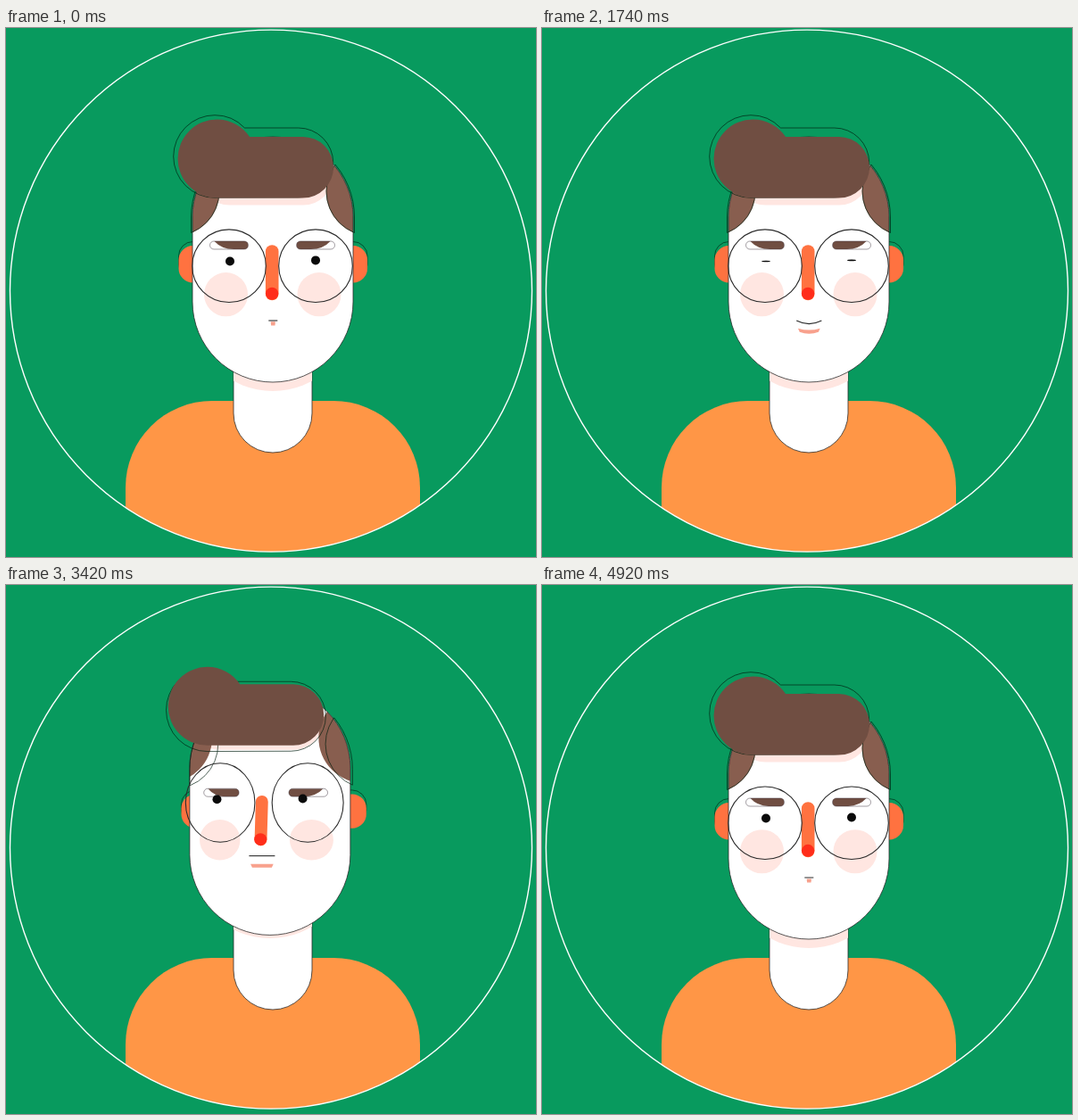
These frames come from a looping animation (594x593 px, 4950 ms). An HTML page with a canvas:

```html
<!DOCTYPE html>
<html lang="en">
<head>
<meta charset="utf-8">
<title>Portrait</title>
<style>
html, body { margin: 0; width: 100%; height: 100%; overflow: hidden; background: #089a5e; }
canvas { display: block; width: 594px; height: 593px; }
</style>
</head>
<body>
<canvas id="stage" width="594" height="593"></canvas>
<script>
const ctx = document.getElementById('stage').getContext('2d');
const LOOP = 4950;
const C = {
  bg: '#089a5e', shirt: '#ff9646', skin: '#ffffff', blush: '#ffe6e1', ear: '#ff7240',
  nose: '#ff2d1a', hair: '#704e42', side: '#885e4f', lip: '#f8a18d', line: '#2b2b2b',
  edge: 'rgba(0,30,15,.75)'
};

// Each measure is given for four poses: front, right, rising left, down.
const M = {
  headX: [299, 306.8, 296.5, 299.3], headTop: [212, 212, 209, 219], headBot: [307, 306.5, 305.5, 313],
  chin: [10, 9, 8.5, 20],
  sideX: [0, 17, -7, 0], sideY: [183, 183, 180, 200],
  rimX: [299, 306.3, 297, 298], rimR: [91.5, 94, 92.5, 94.5], rimTop: [212, 212, 209, 216],
  rimSideL: [189, 195, 186, 184], rimSideR: [409, 419, 409, 411], rimSideY: [183, 183, 181, 188],
  hairX: [236.5, 265.5, 228, 238], hairY: [146.5, 146.3, 144.2, 163.5], hairR: [367, 387, 359.7, 371.5],
  lineX: [234, 251.5, 227.5, 235], lineY: [144, 143.5, 143, 149.5], lineR: [366.7, 386.5, 360, 367.5],
  fringe: [8, 7, 7, 12],
  earL: [193.5, 198, 196, 193.5], earR: [405, 404, 404, 405], earY: [244, 243.3, 241, 257], earH: [41.5, 41.5, 41, 47],
  lensLX: [250, 275.5, 242, 250.8], lensLR: [41.3, 38.3, 39.2, 41.3],
  lensRX: [347, 370, 339.8, 347.6], lensRR: [41.3, 37.7, 40.2, 41.3],
  lensY: [266.7, 265.2, 261.4, 302], lensH: [40.8, 41, 41.2, 34.5],
  cheekLX: [246.5, 269, 241.2, 247.5], cheekLR: [24.5, 24.5, 23, 24.5],
  cheekRX: [351, 368.7, 344, 351.5], cheekRR: [24.5, 20, 24.5, 24.5],
  cheekY: [298.7, 298, 295, 317], cheekH: [24.6, 24.6, 24.4, 28],
  noseX: [298.2, 323.3, 289, 299.2], noseY: [250.5, 249.5, 248, 260.5],
  tipX: [298.2, 325.2, 288, 299.3], tipY: [298, 297.5, 293.8, 314.5], noseW: [14.6, 13, 14, 14.6],
  dotX: [298.1, 327, 287.7, 299.2], dotR: [7.2, 5.6, 7, 7],
  browL: [228.5, 251, 223, 229], browLW: [43, 43, 40, 43],
  browR: [325.5, 353, 318.5, 326], browRW: [43, 33, 43.5, 43], browY: [239, 238, 236.3, 255.3],
  eyeLX: [251, 292.3, 238, 249], eyeRX: [347, 373, 334, 344.7], eyeLY: [261.5, 261.5, 250, 277.7], eyeRY: [260.4, 260.3, 249, 276.2],
  mouthX: [299.3, 325, 289.3, 300.4], mouthY: [328, 326.5, 321.3, 363.3]
};

// Keys are [time, value] pairs joined by a smooth ease.
function track(keys, t) {
  if (t <= keys[0][0]) return keys[0][1];
  for (let i = 1; i < keys.length; i++) {
    const [a, x] = keys[i - 1], [b, y] = keys[i];
    if (t < b) return x + (y - x) * (0.5 - 0.5 * Math.cos(Math.PI * (t - a) / (b - a)));
  }
  return keys[keys.length - 1][1];
}

const turnEnd = [[910, 1.02], [1110, -0.1], [1230, 0], [1740, 0], [2040, -0.2], [2520, -0.2], [3060, 0]];
const T = {
  turn: [[0, 0], [540, 1.02], ...turnEnd],
  gaze: [[0, 0], [610, 1.02], ...turnEnd],
  down: [[1740, 0], [2040, 0.35], [2520, 0.35], [3060, 0], [3660, 0], [4140, 1], [4420, 1], [4935, 0]],
  rise: [[3090, 0], [3600, 1], [3660, 1], [4140, 0]],
  wide: [[1560, 0], [1770, 1], [3660, 1], [4140, 1.37], [4420, 1.37], [4935, 0]],
  smile: [[1560, 0], [1770, 1], [2520, 1], [3060, 0], [3660, 0], [4140, -0.4], [4420, -0.4], [4935, 0]],
  open: [[1620, 1], [1740, 0.16], [1860, 1], [3750, 1], [3870, 0.05], [3990, 1]]
};

function poseAt(t) {
  const k = {}, p = {};
  for (const n in T) k[n] = track(T[n], t);
  for (const n in M) {
    const [front, right, left, low] = M[n];
    const turn = n.startsWith('eye') ? k.gaze : k.turn;
    const dDown = low - front;
    const dRise = 1.64 * (left - front) - 0.64 * dDown;
    p[n] = front + turn * (right - front) + k.down * dDown + k.rise * dRise;
  }
  return Object.assign(p, k);
}

function fill(path, color) { ctx.fillStyle = color; ctx.fill(path); }
function stroke(path, color, width) { ctx.strokeStyle = color; ctx.lineWidth = width; ctx.stroke(path); }
function within(path, draw) { ctx.save(); ctx.clip(path); draw(); ctx.restore(); }

function oval(x, y, rx, ry = rx) {
  const p = new Path2D();
  p.ellipse(x, y, Math.max(rx, 0), Math.max(ry, 0), 0, 0, 2 * Math.PI);
  return p;
}
function box(x, y, w, h, r) {
  const p = new Path2D();
  p.roundRect(x, y, w, h, r);
  return p;
}
function capsule(x, top, bottom, r) { return box(x - r, top - r, 2 * r, bottom - top + 2 * r, r); }

function drawBody(p) {
  const frame = oval(297, 294.6, 292.5);
  within(frame, () => fill(box(134, 418, 330, 200, [97, 97, 0, 0]), C.shirt));
  stroke(frame, '#fff', 1.4);
  const neck = box(255, 360, 88, 116, [0, 0, 44, 44]);
  fill(neck, C.skin);
  stroke(neck, C.line, 0.8);
  within(neck, () => fill(capsule(p.headX, p.headTop, p.headBot + p.chin, 90), C.blush));
}

function drawEars(p) {
  for (const x of [p.earL, p.earR - 34]) {
    stroke(box(x, p.earY - 4.5, 34, p.earH, 16), C.edge, 0.8);
    fill(box(x, p.earY, 34, p.earH, 16), C.ear);
  }
}

// Runs from the curl's top notch round to the pill's right end.
function quiff(x, y, r, top, right, pr) {
  const notch = Math.asin((top - y) / r);
  const path = new Path2D();
  path.moveTo(right - pr, top);
  path.arc(right - pr, top + pr, pr, -Math.PI / 2, Math.PI / 2);
  path.lineTo(x, y + r);
  path.arc(x, y, r, Math.PI / 2, notch + 2 * Math.PI);
  path.closePath();
  return path;
}

function drawHead(p) {
  const head = capsule(p.headX, p.headTop, p.headBot, 90);
  fill(head, C.skin);
  const hairBottom = p.hairY + 44;
  within(head, () => {
    fill(box(p.hairX - 20, hairBottom - 68 + p.fringe, p.hairR - p.hairX + 20, 68, 34), C.blush);
    for (const x of [189, 409]) {
      const lock = oval(x + p.sideX, p.sideY, 50.3);
      fill(lock, C.side);
    }
  });
  stroke(head, C.line, 0.8);

  const rim = capsule(p.rimX, p.rimTop, p.headBot, p.rimR);
  for (const x of [p.rimSideL, p.rimSideR]) {
    const lock = oval(x, p.rimSideY, 50);
    within(rim, () => stroke(lock, C.edge, 0.9));
    within(lock, () => stroke(rim, C.edge, 0.9));
  }
  stroke(quiff(p.lineX, p.lineY, 46.3, p.lineY - 32, p.lineR, 39), C.edge, 0.9);
  fill(quiff(p.hairX, p.hairY, 44, p.hairY - 24.5, p.hairR, 34.25), C.hair);
}

function drawBrow(x, y, w, flip) {
  const pill = box(0, 0, w, 9, 4.5);
  const s = w / 43;
  const hair = new Path2D();
  hair.moveTo(5 * s, 0);
  hair.quadraticCurveTo(13 * s, 9, 27 * s, 9);
  hair.lineTo(w, 9);
  hair.lineTo(w, 0);
  hair.closePath();
  ctx.save();
  ctx.translate(flip ? x + w : x, y);
  if (flip) ctx.scale(-1, 1);
  fill(pill, C.skin);
  within(pill, () => fill(hair, C.hair));
  stroke(pill, 'rgba(60,50,60,.6)', 0.8);
  ctx.restore();
}

function drawMouth(p) {
  const x = p.mouthX, y = p.mouthY, w = p.wide;
  const half = 5 + 9.5 * w, bend = p.smile * 7.5;
  const lips = new Path2D();
  lips.moveTo(x - half, y);
  lips.quadraticCurveTo(x, y + bend, x + half, y);
  stroke(lips, C.line, 1.1);

  const a = 2.6 + 10.2 * w, b = 2.2 + 8.8 * w;
  const top = y + 1.3 + 7.7 * Math.min(w, 1), dip = p.smile * 4;
  const low = new Path2D();
  low.moveTo(x - a, top);
  low.quadraticCurveTo(x, top + dip, x + a, top);
  low.lineTo(x + b, top + 4.2);
  low.quadraticCurveTo(x, top + 4.2 + dip, x - b, top + 4.2);
  low.closePath();
  fill(low, C.lip);
}

function drawFace(p) {
  fill(oval(p.cheekLX, p.cheekY, p.cheekLR, p.cheekH), C.blush);
  fill(oval(p.cheekRX, p.cheekY, p.cheekRR, p.cheekH), C.blush);

  const nose = new Path2D();
  nose.moveTo(p.noseX, p.noseY);
  nose.lineTo(p.tipX, p.tipY);
  ctx.lineCap = 'round';
  stroke(nose, C.ear, p.noseW);
  ctx.lineCap = 'butt';
  fill(oval(p.dotX, p.tipY - 0.2, p.dotR, 7), C.nose);

  drawBrow(p.browL, p.browY, p.browLW, false);
  drawBrow(p.browR, p.browY, p.browRW, true);
  fill(oval(p.eyeLX, p.eyeLY, 5, 5 * p.open), '#0a0a0a');
  fill(oval(p.eyeRX, p.eyeRY, 5, 5 * p.open), '#0a0a0a');
  stroke(oval(p.lensLX, p.lensY, p.lensLR, p.lensH), C.line, 1.1);
  stroke(oval(p.lensRX, p.lensY, p.lensRR, p.lensH), C.line, 1.1);
  drawMouth(p);
}

function draw(t) {
  const p = poseAt(t);
  ctx.fillStyle = C.bg;
  ctx.fillRect(0, 0, 594, 593);
  drawBody(p);
  drawEars(p);
  drawHead(p);
  drawFace(p);
}

const start = performance.now();
function tick() {
  draw((performance.now() - start) % LOOP);
  requestAnimationFrame(tick);
}
tick();
</script>
</body>
</html>
```
